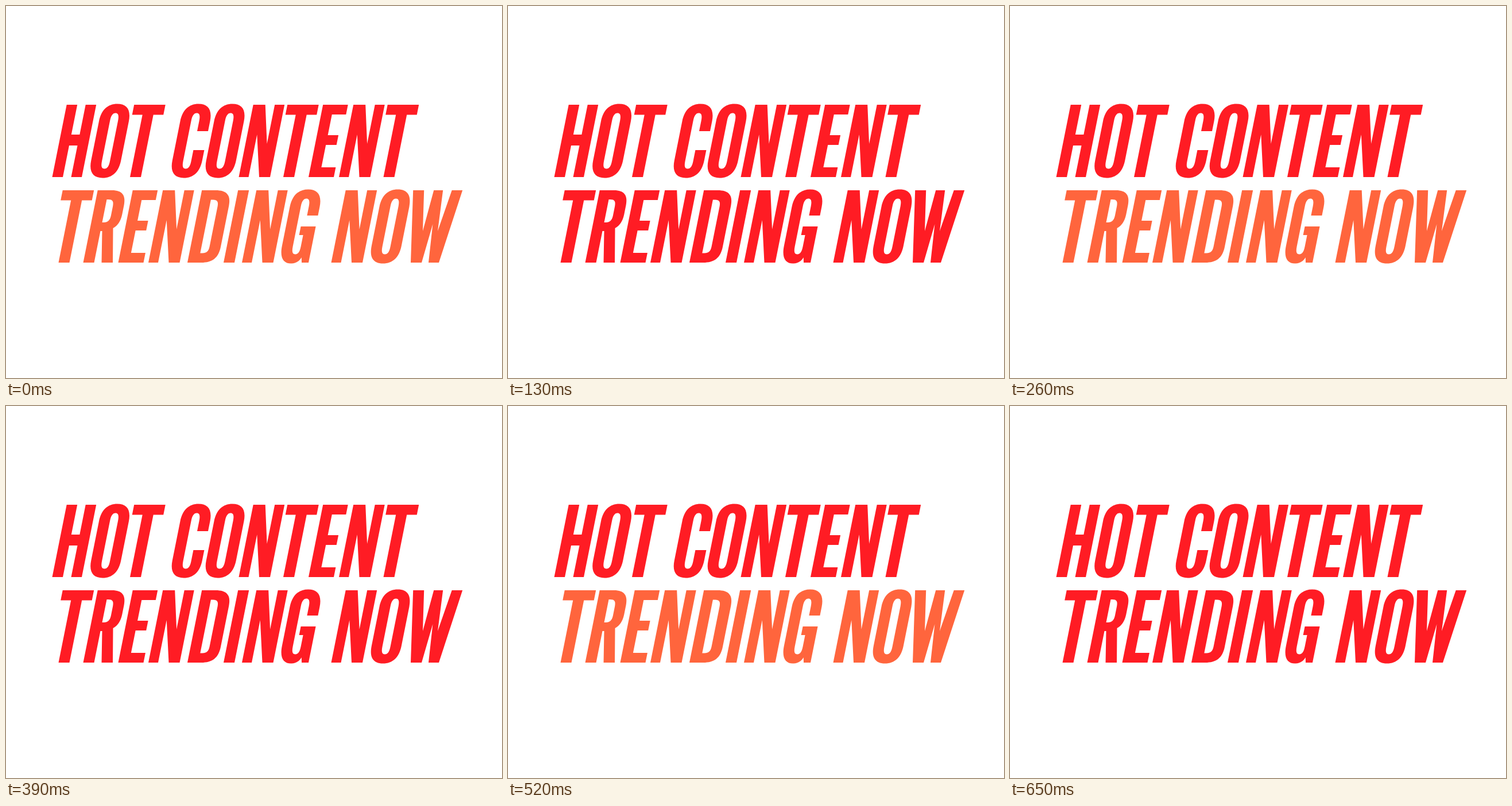
An HTML page for the animation above (780 ms loop, 864 by 648 pixels).

```html
<!DOCTYPE html>
<html lang="en">
<head>
<meta charset="utf-8">
<title>Hot content trending now</title>
<style>
  html, body { margin: 0; width: 100%; height: 100%; overflow: hidden; background: #fff; }
  svg { display: block; width: 864px; height: 648px; }
  .hot { fill: #ff1c24; }
  .trend { animation: blink 260ms step-end infinite; }
  @keyframes blink {
    0% { fill: #ff653d; }
    50%, 100% { fill: #ff1c24; }
  }
</style>
</head>
<body>
<svg viewBox="0 0 864 648" role="img" aria-label="HOT CONTENT TRENDING NOW">
  <!-- Upright condensed capitals, baseline at y = 0; each line is slanted as a group -->
  <defs>
    <g fill-rule="evenodd">
      <path id="H" d="M0 0V-126H18.5V-74H33V-126H51.5V0H33V-55H18.5V0Z"/>
      <path id="O" d="M0-97C0-117 9-127.5 26-127.5S52-117 52-97V-29C52-9 43 1.5 26 1.5S0-9 0-29ZM19-98V-28C19-19 21-14.5 26-14.5S33-19 33-28V-98C33-107 31-111.5 26-111.5S19-107 19-98Z"/>
      <path id="T" d="M0-126H54.5V-108.5H37V0H18V-108.5H0Z"/>
      <path id="C" d="M52-80V-97C52-117 43-127.5 26-127.5S0-117 0-97V-29C0-9 9 1.5 26 1.5S52-9 52-29V-47H33V-28C33-19 31-14.5 26-14.5S19-19 19-28V-98C19-107 21-111.5 26-111.5S33-107 33-98V-80Z"/>
      <path id="N" d="M0 0V-126H21L37.5-58V-126H54.5V0H35.5L17-74V0Z"/>
      <path id="E" d="M0 0V-126H43.5V-109H19V-73H37.5V-56H19V-17H44V0Z"/>
      <path id="R" d="M0 0V-126H25C43-126 51-117 51-100V-84C51-72 47-64 40-60L51.5 0H32L22-55H19V0ZM19-110V-70H22C29-70 32-74 32-82V-98C32-107 29-110 22-110Z"/>
      <path id="D" d="M0 0V-126H24C43-126 52.500-118 52.500-99V-27C52.500-8 43 0 24 0ZM19-109.500V-16.500H23C30-16.500 33-20 33-28V-98C33-106 30-109.500 23-109.500Z"/>
      <path id="I" d="M0 0V-126H19V0Z"/>
      <path id="G" d="M52 0V-63H26V-48H33V-28C33-19 31-14.5 26-14.5S19-19 19-28V-98C19-107 21-111.5 26-111.5S33-107 33-98V-82H52V-97C52-117 43-127.5 26-127.5S0-117 0-97V-29C0-9 8 1.5 22 1.5C30 1.5 35-2 38-9L40 0Z"/>
      <path id="W" d="M0-126H19L31-55L36-126H52L57-55L67.5-126H86L70 0H52L46-67L40 0H21Z"/>
    </g>
  </defs>
  <g class="hot" fill-rule="evenodd" transform="matrix(1 0 -.2 1 0 298)">
    <use href="#H" x="80.5"/>
    <use href="#O" x="142.5"/>
    <use href="#T" x="198"/>
    <use href="#C" x="284"/>
    <use href="#O" x="343"/>
    <use href="#N" x="405.5"/>
    <use href="#T" x="465"/>
    <use href="#E" x="527"/>
    <use href="#N" x="580"/>
    <use href="#T" x="639.5"/>
  </g>
  <g class="trend" fill-rule="evenodd" transform="matrix(1 0 -.2 1 0 447)">
    <use href="#T" x="73.5"/>
    <use href="#R" x="134.5"/>
    <use href="#E" x="195.5"/>
    <use href="#N" x="248"/>
    <use href="#D" x="316"/>
    <use href="#I" x="379"/>
    <use href="#N" x="411"/>
    <use href="#G" x="475"/>
    <use href="#N" x="566.5"/>
    <use href="#O" x="631"/>
    <use href="#W" x="684"/>
  </g>
</svg>
</body>
</html>
```
